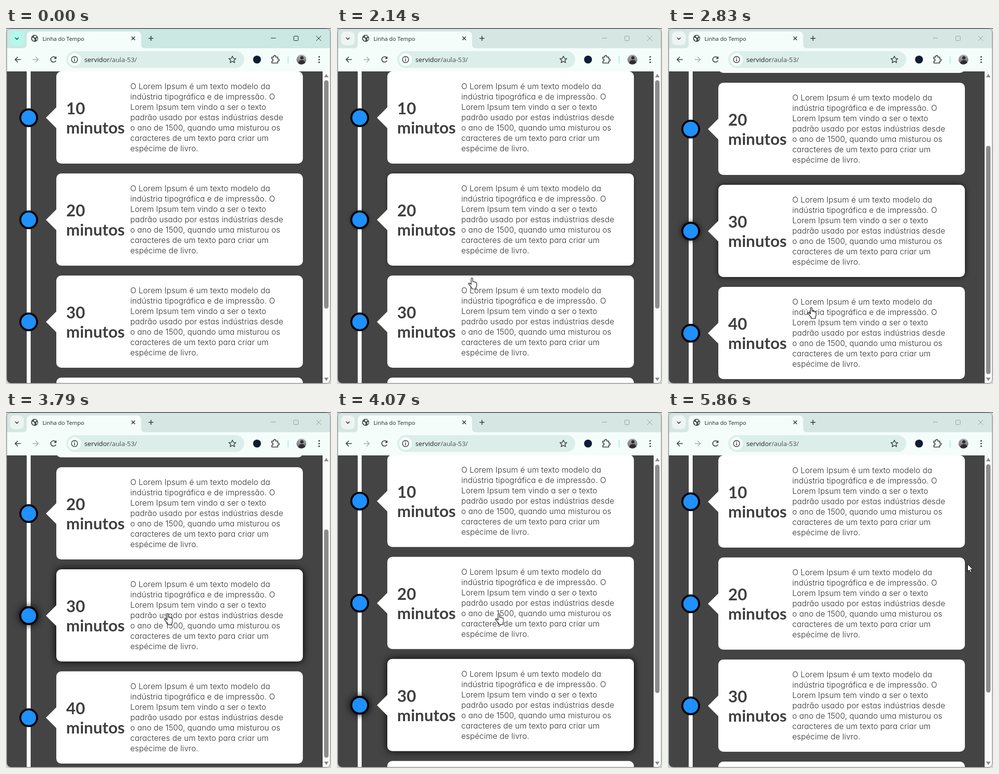
An HTML page that plays this animation: 659 px wide and 722 px high, repeating every 7280 ms.

```html
<!DOCTYPE html>
<html lang="pt">
<head>
<meta charset="utf-8">
<title>Linha do Tempo</title>
<style>
  :root { --loop: 7280ms; --off: 0 0 0 #0000; --on: 0 0 15px #000; }
  html, body { margin: 0; width: 100%; height: 100%; overflow: hidden; background: #cfd0d0; }
  .stage { position: absolute; left: 0; top: 0; width: 659px; height: 722px; overflow: hidden; }
  .stage::before { content: ""; position: absolute; left: 0; top: 0; width: 100%; height: 1px; background: #4c4f4f; }
  .window { position: absolute; left: 1px; top: 1px; width: 655px; height: 718px;
    border: 1px solid #828887; border-radius: 9px; overflow: hidden; background: #f4fdfa; }
  .bar { position: absolute; left: 0; top: 0; }
  .bar text { font-family: "Open Sans", "Noto Sans", sans-serif; fill: #1f2322; }
  .line { fill: none; stroke: #333b39; stroke-width: 1.6; }

  .page { position: absolute; left: 0; top: 86px; width: 640px; height: 632px; overflow: hidden; background: #444; }
  .scroll { position: absolute; left: 0; top: 0; width: 640px; height: 816px; animation: scroll var(--loop) infinite; }
  .rail { position: absolute; left: 40px; top: 0; width: 8px; height: 816px; background: #fff; }
  .dot, .card { position: absolute; animation: var(--glow) var(--loop) ease infinite; }
  .dot { left: 25px; width: 30px; height: 30px; border: 4px solid #000; border-radius: 50%; background: #1e90ff; }
  .card { left: 100px; width: 500px; height: 187px; border-radius: 10px; background: #fff; color: #3f3f3f; white-space: nowrap; }
  .card::before { content: ""; position: absolute; left: -21px; top: 73px;
    border: solid transparent; border-width: 21px 21px 21px 0; border-right-color: #fff; }
  h1, p { position: absolute; margin: 0; }
  h1 { left: 20px; top: 55px; font: 700 33px/39px Lato, "Open Sans", sans-serif; }
  p { left: 150px; top: 20px; font: 300 16px/21px Inter, "Open Sans", sans-serif; color: #303030;
    letter-spacing: .1px; font-feature-settings: "cv11"; }

  .track { position: absolute; left: 640px; top: 86px; width: 15px; height: 632px; background: #fafafa; }
  .track svg { position: absolute; left: 0; top: 0; fill: #8b8b8b; }
  .thumb { position: absolute; left: 3px; top: 18px; width: 9px; height: 463px; border-radius: 5px;
    background: #8b8b8b; animation: thumb var(--loop) infinite; }

  .cursor { position: absolute; left: 0; top: 0; width: 24px; height: 28px; overflow: visible;
    fill: #fff; stroke: #000; stroke-linejoin: round;
    animation: move var(--loop) linear infinite, show var(--loop) step-end infinite; }
  .hand { animation: hand var(--loop) step-end infinite; }
  .arrow { animation: arrow var(--loop) step-end infinite; }
  .strip { animation: strip var(--loop) step-end infinite; }
  .menu { animation: menu var(--loop) step-end infinite; }
  .controls { fill: none; animation: controls var(--loop) step-end infinite; }

  @keyframes strip { 0% { fill: #cbe8e2; } 3.297%, 100% { fill: #d6e6e2; } }
  @keyframes menu { 0% { fill: #b2f9ed; } 3.297%, 100% { fill: #edf4f2; } }
  @keyframes controls { 0% { stroke: #1c2120; } 3.297%, 100% { stroke: #969e9c; } }

  @keyframes scroll {
    0%, 33.65% { transform: translateY(0); animation-timing-function: ease-in-out; }
    37.91%, 52.06% { transform: translateY(-184px); animation-timing-function: ease-out; }
    56.18%, 100% { transform: translateY(0); }
  }
  @keyframes thumb {
    0%, 33.65% { transform: translateY(0); animation-timing-function: ease-in-out; }
    37.91%, 52.06% { transform: translateY(133px); animation-timing-function: ease-out; }
    56.18%, 100% { transform: translateY(0); }
  }

  @keyframes glow1 {
    0%, 13.74%, 24.73%, 62.36%, 80.36%, 100% { box-shadow: var(--off); }
    18.54%, 19.92%, 67.17%, 75.55% { box-shadow: var(--on); }
  }
  @keyframes glow2 {
    0%, 20.6%, 32.55%, 57.69%, 65.9%, 100% { box-shadow: var(--off); }
    25.41%, 27.75%, 61%, 61.13% { box-shadow: var(--on); }
  }
  @keyframes glow3 {
    0%, 28.98%, 42.72%, 47.12%, 60.44%, 100% { box-shadow: var(--off); }
    33.79%, 37.91%, 51.92%, 56.59% { box-shadow: var(--on); }
  }
  @keyframes glow4 {
    0%, 38.19%, 51.37%, 100% { box-shadow: var(--off); }
    42.58%, 46.57% { box-shadow: var(--on); }
  }

  @keyframes move {
    0%, 13.46% { transform: translate(236px, 110px); }
    19.92% { transform: translate(256px, 276px); }
    20.6% { transform: translate(257px, 296px); }
    23.3% { transform: translate(262px, 380px); }
    27.75% { transform: translate(270px, 482px); }
    29.4% { transform: translate(272px, 507px); }
    33.24%, 45.33% { transform: translate(289px, 567px); }
    46.57% { transform: translate(300px, 525px); }
    47.12% { transform: translate(304px, 505px); }
    51.37%, 59.6% { transform: translate(326.5px, 409px); }
    61.2% { transform: translate(329px, 295px); }
    62.36% { transform: translate(331px, 273px); }
    65.25% { transform: translate(335px, 207px); }
    69.9%, 70.5% { transform: translate(340px, 196px); }
    75.55% { transform: translate(510px, 275px); animation-timing-function: ease-out; }
    80.49%, 100% { transform: translate(607px, 308px); }
  }
  @keyframes show { 0% { opacity: 0; } 13.46%, 100% { opacity: 1; } }
  @keyframes hand {
    0%, 20.6%, 28.98%, 47.12%, 62.36% { opacity: 1; }
    19.92%, 27.75%, 46.57%, 61.2%, 75.55%, 100% { opacity: 0; }
  }
  @keyframes arrow {
    0%, 20.6%, 28.98%, 47.12%, 62.36% { opacity: 0; }
    19.92%, 27.75%, 46.57%, 61.2%, 75.55%, 100% { opacity: 1; }
  }
</style>
</head>
<body>
<div class="stage">
  <div class="window">
    <!-- the bar is drawn in stage coordinates -->
    <svg class="bar" width="655" height="86" viewBox="2 2 655 86">
      <defs>
        <linearGradient id="photo" x2="0" y2="1">
          <stop offset="0" stop-color="#a9adb0"/><stop offset="1" stop-color="#6d6a6b"/>
        </linearGradient>
        <clipPath id="round"><circle cx="599" cy="64" r="10"/></clipPath>
      </defs>
      <rect class="strip" x="2" y="2" width="655" height="39"/>
      <rect class="menu" x="8" y="7" width="28" height="28" rx="9"/>
      <path class="line" d="M18.5 19.5 22 23l3.5-3.5"/>
      <path fill="#f4fdfa" d="M34 41q8 0 8-8V16q0-9 9-9H265q9 0 9 9V33q0 8 8 8Z"/>
      <circle cx="58" cy="21" r="7.2" fill="#49524f"/>
      <path fill="#f4fdfa" d="M52.5 19.5l4 1 1.5 2.5-1 3.5q-4-1.500-4.500-7zM57 15.500l4 .5 1 2-3 1.500-2.500-1.500zM61 21l3-.5q0 3-2 4.500z"/>
      <text x="74" y="26" font-size="11.3">Linha do Tempo</text>
      <path class="line" d="M254.500 17.500l7 7m0-7l-7 7M289 21h10m-5-5v10"/>
      <g class="controls">
        <path d="M537 20.500h10M629 16l10 10m0-10l-10 10"/>
        <rect x="583.500" y="16.500" width="9" height="9" rx="1"/>
      </g>

      <rect x="2" y="41" width="655" height="47" fill="#f4fdfa"/>
      <path class="line" d="M30 64H19m5-5.500L18.500 64l5.500 5.500"/>
      <path class="line" style="stroke:#a6afad" d="M54 64h11m-5-5.500l5.500 5.500-5.500 5.500"/>
      <path class="line" d="M101 61a5.500 5.500 0 1 0 .3 5M101.500 58v4h-4"/>
      <rect x="122" y="47" width="361" height="34" rx="17" fill="#dceeea"/>
      <circle cx="139" cy="64" r="13" fill="#f4fdfa"/>
      <circle class="line" cx="139" cy="64" r="6.200" style="stroke-width:1.400"/>
      <path class="line" d="M139 63v4.500M139 60.200v1.600"/>
      <text x="159" y="69" font-size="13.300">servidor<tspan fill="#48504e">/aula-53/</tspan></text>
      <path class="line" style="stroke-width:1.400" stroke-linejoin="round"
        d="M459 57l2.100 4.600 5 .5-3.800 3.300 1.200 4.900-4.500-2.600-4.500 2.600 1.200-4.900-3.800-3.300 5-.5z"/>
      <circle cx="509" cy="64" r="8" fill="#101b35"/>
      <path class="line" stroke-linejoin="round"
        d="M539 59h4v-1.500a2 2 0 0 1 4 0V59h4v4h1a2 2 0 0 1 0 4h-1v4h-12v-3.500a2.300 2.300 0 0 0 0-5z"/>
      <rect x="571" y="56" width="2" height="16" rx="1" fill="#b4eef2"/>
      <g clip-path="url(#round)">
        <rect x="589" y="54" width="20" height="20" fill="url(#photo)"/>
        <circle cx="600" cy="60.500" r="3.300" fill="#2d2d31"/>
        <path d="M592 76q0-11 8-11t7 11z" fill="#2d2d31"/>
      </g>
      <g fill="#333b39">
        <circle cx="635" cy="58.500" r="1.600"/><circle cx="635" cy="64" r="1.600"/><circle cx="635" cy="69.500" r="1.600"/>
      </g>
    </svg>

    <div class="page"><div class="scroll"><div class="rail"></div></div></div>
    <div class="track">
      <svg width="15" height="632"><path d="M7.500 5l4.500 7H3zM7.500 628l4.500-7H3z"/></svg>
      <div class="thumb"></div>
    </div>
  </div>

  <svg class="cursor">
    <path class="hand" transform="translate(-6 -1)" stroke-width="1.100"
      d="M6 2.500Q6 .8 7.600 .8Q9.200 .8 9.200 2.500V8.300Q11.600 7.400 12 9Q14.300 8.200 14.700 10Q17.300 9.400 17.300 12V16Q17.300 18.500 15.600 20.500V23.200H7.400V21Q5 18.500 1 13.200Q.2 11.600 1.800 11.100Q3.400 10.900 6 13.800Z"/>
    <path class="arrow" d="M.5 .5V15.500L4 12.300L6.300 17.600L8.800 16.500L6.500 11.400H11.200Z"/>
  </svg>
</div>

<script>
  const lines = [
    "O Lorem Ipsum é um texto modelo da",
    "indústria tipográfica e de impressão. O",
    "Lorem Ipsum tem vindo a ser o texto",
    "padrão usado por estas indústrias desde",
    "o ano de 1500, quando uma misturou os",
    "caracteres de um texto para criar um",
    "espécime de livro."
  ];
  const pitch = 207;
  const entry = n => {
    const top = (n - 1) * pitch;
    const style = y => `style="top:${y}px;--glow:glow${n}"`;
    return `<div class="dot" ${style(top + 75)}></div>
      <div class="card" ${style(top)}><h1>${n * 10}<br>minutos</h1><p>${lines.join("<br>")}</p></div>`;
  };
  document.querySelector(".scroll").insertAdjacentHTML("beforeend", [1, 2, 3, 4].map(entry).join(""));
</script>
</body>
</html>
```
